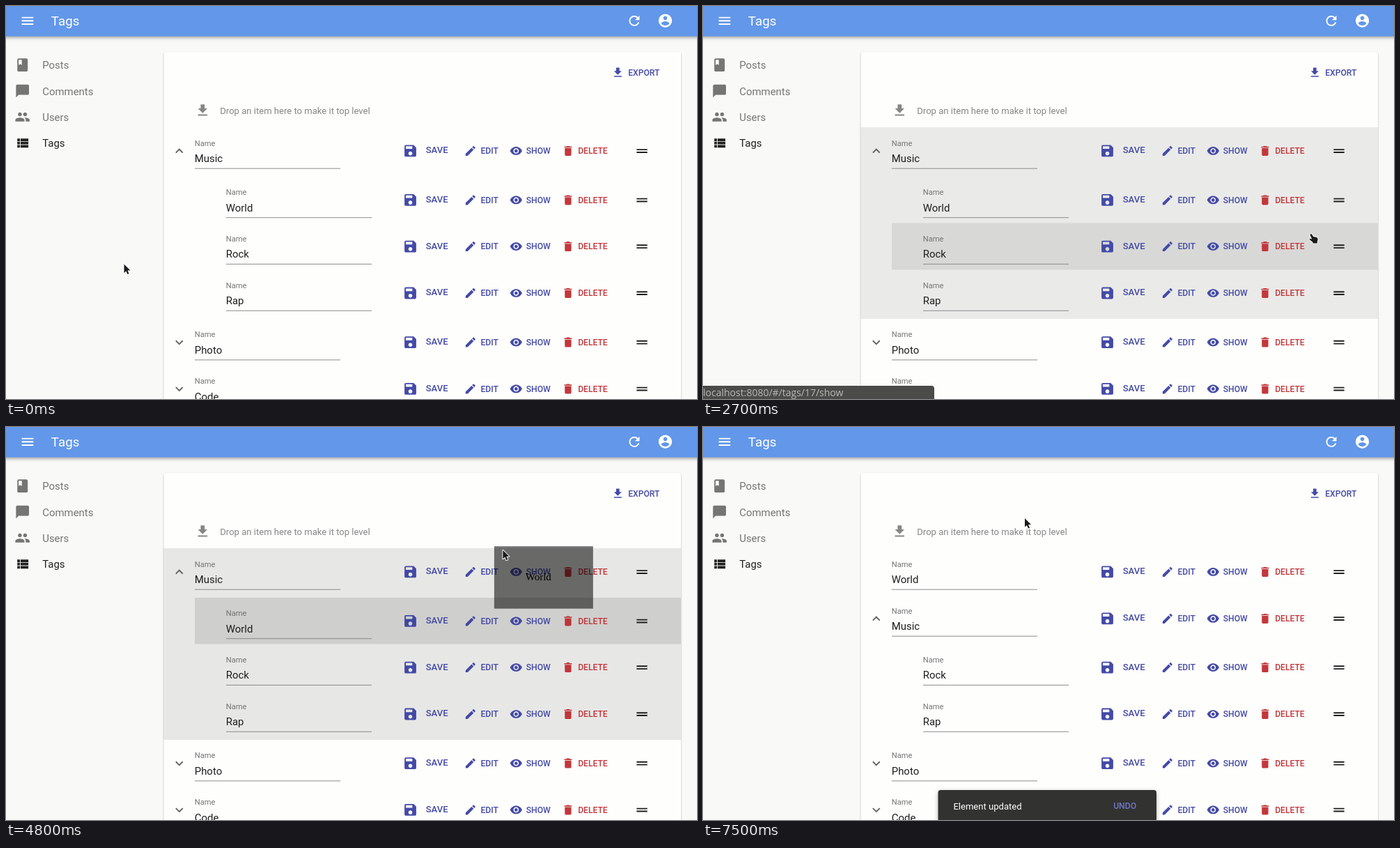
An HTML page for the animation above (8 s loop, 992 by 564 pixels).

```html
<!DOCTYPE html>
<html lang="en">
<head>
<meta charset="utf-8">
<title>Tags</title>
<style>
  html, body { margin: 0; width: 100%; height: 100%; overflow: hidden; background: #f9f9f8; }
  svg { display: block; width: 992px; height: 564px; font-family: Roboto, Arial, sans-serif; }
  text { white-space: pre; }
  .bar { fill: #6297e9; filter: drop-shadow(0 2px 2px rgba(0,0,0,.26)) drop-shadow(0 1px 3px rgba(0,0,0,.14)); }
  .card { fill: #fefefd; filter: drop-shadow(0 1px 1.2px rgba(0,0,0,.28)); }
  .title { font-size: 18.7px; letter-spacing: .1px; fill: #fff; }
  .body { font-size: 14.96px; }
  .hint { font-size: 13.07px; }
  .label { font-size: 11.2px; fill: #767675; }
  .save { font-size: 13.07px; font-weight: 500; }
  .button { font-size: 12.13px; font-weight: 500; }
  .status { font: 14px "Open Sans", sans-serif; fill: #b9b9b8; }
  .ghost { font: 14.96px "Liberation Serif", serif; fill: #000; }
  .snack { fill: #323231; filter: drop-shadow(0 2px 3px rgba(0,0,0,.3)); }
</style>
</head>
<body>
<svg id="stage" viewBox="0 0 992 564"></svg>
<script>
const INDIGO = '#444aa6', RED = '#c2373b', GREY = '#757573', DARK = '#1f1f1e';
const LOOP = 8000, STEP = 100;

const ICONS = {
  menu: 'M3 18h18v-2H3v2zm0-5h18v-2H3v2zm0-7v2h18V6H3z',
  refresh: 'M17.65 6.35C16.2 4.9 14.21 4 12 4c-4.42 0-7.99 3.58-7.99 8s3.57 8 7.99 8c3.73 0 6.84-2.55 7.73-6h-2.08c-.82 2.33-3.04 4-5.65 4-3.31 0-6-2.69-6-6s2.69-6 6-6c1.66 0 3.14.69 4.22 1.78L13 11h7V4l-2.35 2.35z',
  account: 'M12 2C6.48 2 2 6.48 2 12s4.48 10 10 10 10-4.48 10-10S17.52 2 12 2zm0 3c1.66 0 3 1.34 3 3s-1.34 3-3 3-3-1.34-3-3 1.34-3 3-3zm0 14.2c-2.5 0-4.71-1.28-6-3.22.03-1.99 4-3.08 6-3.08 1.99 0 5.97 1.09 6 3.08-1.29 1.94-3.5 3.22-6 3.22z',
  book: 'M18 2H6c-1.1 0-2 .9-2 2v16c0 1.1.9 2 2 2h12c1.1 0 2-.9 2-2V4c0-1.1-.9-2-2-2zM6 4h5v8l-2.5-1.5L6 12V4z',
  chat: 'M20 2H4c-1.1 0-2 .9-2 2v18l4-4h14c1.1 0 2-.9 2-2V4c0-1.1-.9-2-2-2z',
  people: 'M16 11c1.66 0 2.99-1.34 2.99-3S17.66 5 16 5c-1.66 0-3 1.34-3 3s1.34 3 3 3zm-8 0c1.66 0 2.99-1.34 2.99-3S9.66 5 8 5C6.34 5 5 6.34 5 8s1.34 3 3 3zm0 2c-2.33 0-7 1.17-7 3.5V19h14v-2.5c0-2.33-4.67-3.5-7-3.5zm8 0c-.29 0-.62.02-.97.05 1.16.84 1.97 1.97 1.97 3.45V19h6v-2.5c0-2.33-4.67-3.5-7-3.5z',
  list: 'M4 14h4v-4H4v4zm0 5h4v-4H4v4zM4 9h4V5H4v4zm5 5h12v-4H9v4zm0 5h12v-4H9v4zM9 5v4h12V5H9z',
  download: 'M19 9h-4V3H9v6H5l7 7 7-7zM5 18v2h14v-2H5z',
  save: 'M17 3H5c-1.11 0-2 .9-2 2v14c0 1.1.89 2 2 2h14c1.1 0 2-.9 2-2V7l-4-4zm-5 16c-1.66 0-3-1.34-3-3s1.34-3 3-3 3 1.34 3 3-1.34 3-3 3zm3-10H5V5h10v4z',
  edit: 'M3 17.25V21h3.75L17.81 9.94l-3.75-3.75L3 17.25zM20.71 7.04c.39-.39.39-1.02 0-1.41l-2.34-2.34c-.39-.39-1.02-.39-1.41 0l-1.83 1.83 3.75 3.75 1.83-1.83z',
  show: 'M12 4.5C7 4.5 2.73 7.61 1 12c1.73 4.39 6 7.5 11 7.5s9.27-3.11 11-7.5c-1.73-4.39-6-7.5-11-7.5zM12 17c-2.76 0-5-2.24-5-5s2.24-5 5-5 5 2.24 5 5-2.24 5-5 5zm0-8c-1.66 0-3 1.34-3 3s1.34 3 3 3 3-1.34 3-3-1.34-3-3-3z',
  trash: 'M6 19c0 1.1.9 2 2 2h8c1.1 0 2-.9 2-2V7H6v12zM19 4h-3.5l-1-1h-5l-1 1H5v2h14V4z',
  handle: 'M20 9H4v2h16V9zM4 15h16v-2H4v2z',
  more: 'M16.59 8.59L12 13.17 7.41 8.59 6 10l6 6 6-6z',
  less: 'M12 8l-6 6 1.41 1.41L12 10.83l4.59 4.58L18 14z'
};

const icon = (name, cx, cy, fill, size = 22.4) =>
  `<path d="${ICONS[name]}" fill="${fill}" transform="translate(${cx - size / 2} ${cy - size / 2}) scale(${size / 24})"/>`;
const text = (str, x, y, cls, fill = '') =>
  `<text x="${x}" y="${y}" class="${cls}"${fill && ` fill="${fill}"`}>${str}</text>`;
const shade = (id, x, y, h) =>
  `<rect id="${id}" x="${x}" y="${y}" width="${969 - x}" height="${h}" opacity="0"/>`;
const button = (name, label, iconX, x, color) =>
  icon(name, iconX, .4, color, 18.66) + text(label, x, 4.5, 'button', color);

const menuItem = (name, label, y, color, textColor = color) =>
  icon(name, 23.7, y - .3, color) + text(label, 52.2, y + 5.4, 'body', textColor);

const row = (name, x, cy, chevron) => `
  <g id="row${name}" transform="translate(0 ${cy})">
    <g id="field${name}" transform="translate(${x} 0)">
      ${text('Name', -.3, -7, 'label')}${text(name, -.3, 16.7, 'body', DARK)}
      <rect y="25.2" width="209" height="1" fill="#8d8d8c"/>
    </g>
    ${chevron ? icon(chevron, 248.8, .6, '#60605f') : ''}
    ${icon('save', 580.5, .4, INDIGO)}${text('SAVE', 602.7, 3.8, 'save', INDIGO)}
    ${button('edit', 'EDIT', 666.8, 681.4, INDIGO)}
    ${button('show', 'SHOW', 732.3, 746.7, INDIGO)}
    ${button('trash', 'DELETE', 806.9, 821.2, RED)}
    ${icon('handle', 913, .5, DARK, 23)}
  </g>`;

document.getElementById('stage').innerHTML = `
  <clipPath id="outer"><rect x="226.5" y="174" width="742.5" height="275"/></clipPath>
  <clipPath id="inner"><rect x="271" y="245" width="698" height="66.5"/></clipPath>
  <rect width="992" height="564" fill="#f9f9f8"/>
  <rect class="card" x="226.5" y="66" width="742.5" height="540" rx="3.5"/>
  <rect class="bar" x="-10" y="-10" width="1012" height="53.5"/>
  ${icon('menu', 31, 21.3, '#fff')}${text('Tags', 64.8, 28.4, 'title')}
  ${icon('refresh', 902, 21.3, '#fff')}${icon('account', 946.5, 21.1, '#fff', 23)}
  ${menuItem('book', 'Posts', 85, GREY)}
  ${menuItem('chat', 'Comments', 122.3, GREY)}
  ${menuItem('people', 'Users', 159.6, GREY)}
  ${menuItem('list', 'Tags', 197, DARK)}
  ${icon('download', 878.3, 95.6, INDIGO, 18.66)}${text('EXPORT', 893.2, 100.4, 'button', INDIGO)}
  ${shade('hoverDrop', 226.5, 125, 49)}
  ${shade('hoverMusic', 226.5, 174, 275)}
  ${shade('hoverWorld', 271, 245, 66.5)}
  ${shade('hoverRock', 271, 311.5, 67)}
  ${shade('hoverRap', 271, 378.5, 67)}
  ${shade('hoverPhoto', 226.5, 449, 67)}
  ${shade('hoverCode', 226.5, 516, 67)}
  <g id="hint">${icon('download', 282.3, 149.8, 'currentColor', 23)}
    ${text('Drop an item here to make it top level', 307.3, 155.1, 'hint', 'currentColor')}</g>
  ${row('Music', 271, 207.5, 'less')}
  ${row('World', 316, 278)}
  ${row('Rock', 316, 344.7)}
  ${row('Rap', 316, 411.6)}
  ${row('Photo', 271, 482.2, 'more')}
  ${row('Code', 271, 549, 'more')}
  <g clip-path="url(#outer)"><circle id="rippleMusic" cx="917" cy="280"/></g>
  <g clip-path="url(#inner)"><circle id="rippleWorld" cx="917" cy="280"/></g>
  <g id="status"><path d="M0 545H328Q332 545 332 549V564H0Z" fill="#4b4b4a"/>
    ${text('localhost:8080/#/tags/17/show', 0, 560, 'status')}</g>
  <g id="snack"><rect class="snack" x="337.5" y="521" width="313.5" height="45" rx="3.7"/>
    ${text('Element updated', 359.4, 548.7, 'hint', '#fff')}${text('UNDO', 589.2, 548.3, 'button', '#7078c6')}</g>
  <g id="ghost"><rect width="142" height="89.5" opacity=".545"/>${text('World', 45, 49, 'ghost')}</g>
  <g id="cursor" stroke="#fff" stroke-width="1" stroke-linejoin="round" fill="#1b1b1b" paint-order="stroke">
    <path id="arrow" stroke-width="1.8" d="M0 0V12.6L2.9 9.9L5 14.6L7 13.7L5 9.1H9Z"/>
    <path id="hand" stroke-width="1.8" d="M-1.6 1.3Q-.6-.8 1.1.8L3.2 4L8 5Q10 5.6 9.6 8.5L8.8 11.5V13.4H2.5V12L-2 8.6Q-3 7.4-1.4 6.8L1.2 7.4Z"/>
  </g>`;

const el = {};
document.querySelectorAll('[id]').forEach(node => el[node.id] = node);

// Pointer path: time, x, y
const PATH = [
  [300, 169.5, 370.5], [600, 262, 262], [800, 370, 198], [1000, 430, 208], [1100, 452.5, 264],
  [1200, 500, 434], [1300, 525, 478], [1600, 590, 530], [2000, 640, 494], [2100, 640, 494],
  [2300, 704, 437], [2500, 780, 385], [2700, 873, 327], [3000, 914, 288], [3100, 918, 286],
  [3200, 918, 286], [3700, 917, 274.5], [4300, 917, 274.5], [4700, 760, 190], [5000, 620, 150],
  [5200, 556, 153], [5300, 535, 140.5], [5400, 535, 140.5], [5800, 462, 131]
];

// Hover spans: start, end
const HOVERS = {
  Drop: [[5450, 7190]],
  Music: [[550, 1110], [2300, 4880]],
  World: [[2790, 4880]],
  Rock: [[2460, 2760]],
  Rap: [[2290, 2440]],
  Photo: [[1230, 1480], [1750, 2240]],
  Code: [[1480, 1750]]
};

const clamp = v => Math.min(1, Math.max(0, v));
const ramp = (t, start, length) => clamp((t - start) / length);

// cubic-bezier(.4, 0, .2, 1)
function ease(x) {
  let lo = 0, hi = 1, p = .5;
  for (let i = 0; i < 20; i++, p = (lo + hi) / 2) {
    const q = 1 - p;
    if (1.2 * p * q * q + .6 * p * p * q + p ** 3 < x) lo = p; else hi = p;
  }
  return 3 * p * p * (1 - p) + p ** 3;
}

function pointer(t) {
  const i = PATH.findIndex(p => p[0] >= t);
  if (i < 0) return PATH[PATH.length - 1].slice(1);
  if (i === 0) return PATH[0].slice(1);
  const [t0, x0, y0] = PATH[i - 1], [t1, x1, y1] = PATH[i];
  const k = (t - t0) / (t1 - t0);
  return [x0 + (x1 - x0) * k, y0 + (y1 - y0) * k];
}

const move = (node, x, y) => node.setAttribute('transform', `translate(${x} ${y})`);
const show = (node, on) => node.setAttribute('visibility', on ? 'visible' : 'hidden');

function ripple(node, radius, opacity, scale) {
  node.setAttribute('r', radius * scale);
  node.setAttribute('opacity', opacity);
}

function render(t) {
  const [x, y] = pointer(t);
  const dropped = t >= 7200;

  move(el.cursor, x, y);
  const pointing = t >= 600 && t < 4400;
  show(el.arrow, !pointing);
  show(el.hand, pointing);

  for (const name in HOVERS) {
    const level = HOVERS[name].reduce((sum, [on, off]) => sum + ramp(t, on, 150) - ramp(t, off, 150), 0);
    el['hover' + name].setAttribute('opacity', .08 * level);
  }

  const scale = ease(ramp(t, 4084, 550));
  const opacity = (.1 + .2 * scale) * (1 - ease(ramp(t, 4450, 550)));
  ripple(el.rippleMusic, 712, opacity * .45, scale);
  ripple(el.rippleWorld, 648, opacity, scale);

  show(el.ghost, t >= 4500 && t < 6400);
  move(el.ghost, x - 12.5, y - 5.5);
  el.hint.setAttribute('color', t >= 5000 && !dropped ? '#111' : '#868685');

  move(el.rowMusic, 0, dropped ? 274.5 : 207.5);
  move(el.rowWorld, 0, dropped ? 207.5 : 278);
  move(el.fieldWorld, dropped ? 271 : 316, 0);

  show(el.status, t >= 2500 && t < 3100);
  const rise = 1 - (1 - ramp(t, 7220, 225)) ** 3;
  show(el.snack, rise > 0);
  move(el.snack, 0, 46 * (1 - rise));
}

const begin = performance.now();
function tick() {
  const t = (performance.now() - begin) % LOOP;
  render(Math.floor(t / STEP) * STEP);
  requestAnimationFrame(tick);
}
render(0);
requestAnimationFrame(tick);
</script>
</body>
</html>
```
